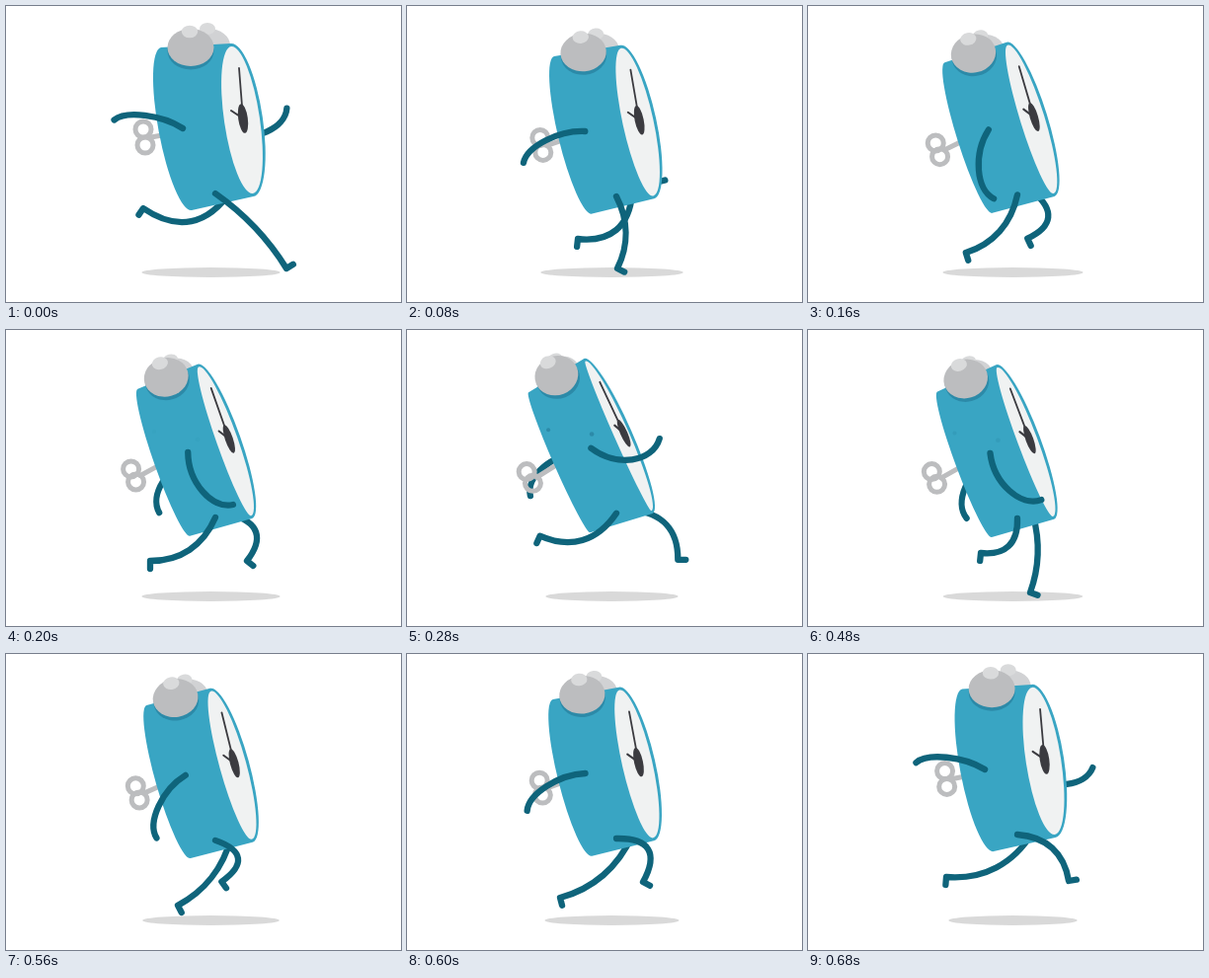
These frames come from a looping animation (400x300 px, 720 ms). An HTML page with a canvas:

```html
<!DOCTYPE html>
<html lang="en">
<head>
<meta charset="utf-8">
<title>Running alarm clock</title>
<style>
html, body { margin: 0; width: 100%; height: 100%; overflow: hidden; background: #fff; }
canvas { display: block; }
</style>
</head>
<body>
<canvas id="stage" width="400" height="300"></canvas>
<script>
const ctx = document.getElementById('stage').getContext('2d');
const LOOP = 720, STEP = 40, TAU = 2 * Math.PI;
const BLUE = '#39a5c3', SHADE = '#2c8aa8', LIMB = '#0f647b';
const GRAY = '#bcbdbf', PALE = '#d9dadb', INK = '#3b3b40';

// time, turn (0 = facing us, 1 = edge on), hip height, far arm angle in degrees
const BODY = [
  [0, 0, 190, 114], [80, .2, 193, 48], [200, .59, 190, -32], [360, 1, 183, -51],
  [480, .65, 191, -23], [600, .23, 187, 20], [680, .02, 183, 97]
];
// time, ankle relative to hip, knee bend
const NEAR_LEG = [
  [0, 72, 76, 7], [80, 1, 73, 12], [120, -31, 73, 13], [200, -66, 44, 17],
  [360, -77, 11, 25], [480, -37, 35, 19], [600, 27, 44, 29], [680, 52, 47, 18]
];
const FAR_LEG = [
  [0, -89, 18, 30], [80, -55, 46, 24], [200, 16, 47, 24], [360, 71, 58, 15],
  [400, 78, 80, 7], [480, -3, 78, 8], [600, -73, 63, 15], [680, -88, 46, 20]
];

// Smooth cyclic interpolation through the keys
function sample(keys, t) {
  const n = keys.length;
  const key = i => keys[(i + n) % n];
  const time = i => key(i)[0] + LOOP * Math.floor(i / n);
  let i = n - 1;
  while (keys[i][0] > t) i--;
  const span = time(i + 1) - time(i), u = (t - time(i)) / span;
  const slope = (j, k) => (key(j + 1)[k] - key(j - 1)[k]) / (time(j + 1) - time(j - 1)) * span;
  return key(i).slice(1).map((a, j) => {
    const k = j + 1, b = key(i + 1)[k];
    return a + u * u * (3 - 2 * u) * (b - a)
      + u * (1 - u) * ((1 - u) * slope(i, k) - u * slope(i + 1, k));
  });
}

function oval(x, y, rx, ry, color, angle = 0) {
  ctx.beginPath();
  ctx.ellipse(x, y, rx, ry, angle, 0, TAU);
  ctx.fillStyle = color;
  ctx.fill();
}

function stroke(color, width) {
  ctx.strokeStyle = color;
  ctx.lineWidth = width;
  ctx.stroke();
}

function line(a, b, color, width) {
  ctx.beginPath();
  ctx.moveTo(...a);
  ctx.lineTo(...b);
  stroke(color, width);
}

// Curve from a joint along (dx, dy), bowed sideways by bend; a foot stands square to the shin
function limb(x, y, dx, dy, bend, reach, foot) {
  const length = Math.hypot(dx, dy), nx = dy / length * bend, ny = -dx / length * bend;
  const endX = x + dx, endY = y + dy;
  const kneeX = x + reach * dx + nx, kneeY = y + reach * dy + ny;
  ctx.beginPath();
  ctx.moveTo(x, y);
  ctx.bezierCurveTo(x + .33 * dx + nx, y + .33 * dy + ny, kneeX, kneeY, endX, endY);
  if (foot) {
    const sx = endX - kneeX, sy = endY - kneeY, k = foot / Math.hypot(sx, sy);
    ctx.lineTo(endX + sy * k, endY - sx * k);
  }
  stroke(LIMB, 6.3);
}

function leg(keys, t, x, y) {
  limb(x, y, ...sample(keys, t), .68, 8);
}

function arm(x, y, degrees, length, bend) {
  const a = degrees * TAU / 360;
  limb(x, y, length * Math.sin(a), length * Math.cos(a), -bend, .85);
}

// Half ellipses left and right of the long axis between two points
function disc(top, bottom, left, right, grow = 0) {
  const dx = bottom[0] - top[0], dy = bottom[1] - top[1], q = TAU / 4;
  const x = (top[0] + bottom[0]) / 2, y = (top[1] + bottom[1]) / 2;
  const half = Math.hypot(dx, dy) / 2 + grow, angle = -Math.atan2(dx, dy);
  if (left) ctx.ellipse(x, y, left + grow, half, angle, q, 3 * q);
  if (right) ctx.ellipse(x, y, right + grow, half, angle, -q, q);
}

function draw(t) {
  const [turn, hip, farSwing] = sample(BODY, t);
  const swing = (1 - Math.cos(TAU * (t + 16) / LOOP)) / 2;
  const mix = (a, b) => a + (b - a) * turn;
  // Point on the clock, relative to hip height, between its two extreme turns
  const at = (x0, y0, x1, y1) => [mix(x0, x1), hip + mix(y0, y1)];
  const faceAxis = [at(228, -149, 172, -155), at(250, 0, 247, -3)];
  const faceLeft = mix(18, 1.5), faceRight = mix(18, 10);
  const lean = -.44 * turn;

  ctx.clearRect(0, 0, 400, 300);
  ctx.lineCap = ctx.lineJoin = 'round';
  oval(207.5, 270, 64.5 + .7 * (hip - 182), 5, '#d9d9d9');

  arm(mix(225, 165), hip - 60, farSwing, 65, 18);
  leg(FAR_LEG, t, 228, hip - 3);

  // Winding key
  const loops = [at(139, -65, 118, -38), at(141, -49, 125, -27)];
  const middle = [0, 1].map(i => (loops[0][i] + loops[1][i]) / 2 + 7 * (1 - i));
  line(middle, at(158, -59, 150, -47), GRAY, 5);
  for (const [x, y] of loops) {
    ctx.beginPath();
    ctx.arc(x, y, 8, 0, TAU);
    stroke(GRAY, 5);
  }

  // Far bell
  oval(...at(205, -150, 144, -140), 22, 17, '#d1d2d4', lean);
  oval(...at(204, -167, 140, -154), 8, 6, PALE, lean);

  // Drum
  ctx.beginPath();
  disc(at(157, -148, 117, -118), at(188, 17, 185, 20), mix(18, 3.5), 0);
  disc(...faceAxis, 0, faceRight, 3);
  ctx.fillStyle = BLUE;
  ctx.fill();
  ctx.globalAlpha = Math.min(1, Math.max(0, (turn - .57) / .25));
  oval(...at(166, -93, 139, -83), 2, 2, SHADE);
  oval(...at(210, -76, 183, -81), 2.3, 2.3, SHADE);
  ctx.globalAlpha = 1;

  // Face and hands
  ctx.beginPath();
  disc(...faceAxis, faceLeft, faceRight);
  ctx.fillStyle = '#f0f2f2';
  ctx.fill();
  const hub = at(240, -76, 216, -82);
  line(at(236, -127, 188, -134), hub, INK, 1.8);
  line(at(228, -84, 207, -90), hub, INK, 2);
  oval(...hub, mix(4.8, 3.4), 15, INK, mix(-.14, -.46));

  // Near bell
  const [x, y] = at(187, -148, 145, -138);
  const rx = mix(23.5, 22), ry = mix(19, 20);
  oval(x + 2 * turn, y + 3.5, rx, ry, SHADE, lean);
  oval(x, y, rx, ry, GRAY, lean);
  oval(...at(186, -164, 135, -151), 8.2, 6.3, PALE, lean);

  leg(NEAR_LEG, t, 212, hip);
  arm(179 + 8 * swing, hip - 66, -98 + 212 * swing, 70, 11 + 13 * swing);
}

const start = performance.now();
function tick() {
  const elapsed = (performance.now() - start) % LOOP;
  draw(Math.floor(elapsed / STEP) * STEP);
  requestAnimationFrame(tick);
}
tick();
</script>
</body>
</html>
```
